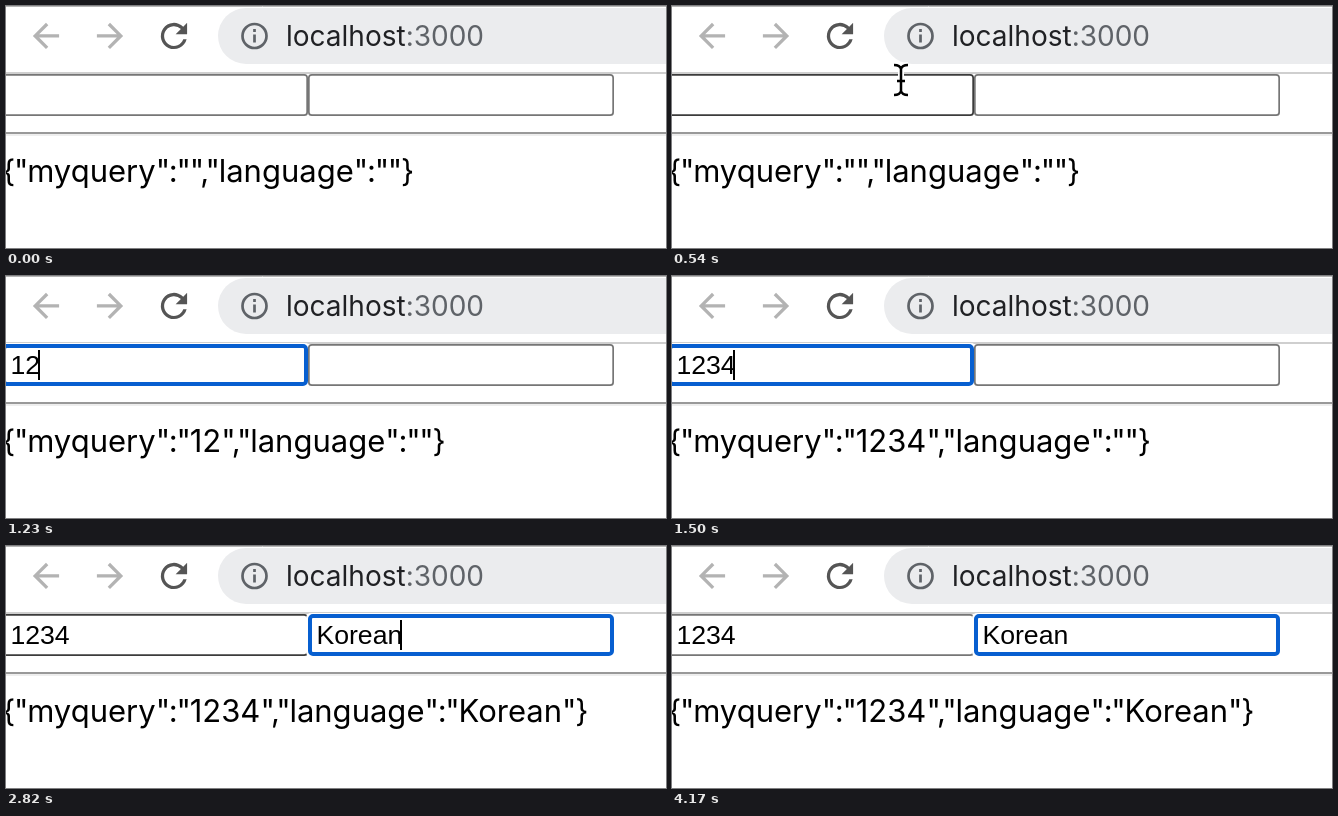
Animation of 660 by 242 pixels, one loop 4260 ms. Source, as an HTML page:

```html
<!DOCTYPE html>
<html lang="en">
<meta charset="utf-8">
<title>Form state</title>
<style>
  html, body { margin: 0; width: 100%; height: 100%; overflow: hidden; background: #fff; }
  svg { display: block; width: 660px; height: 242px; }
  text { white-space: pre; }
  .ui { font-family: Inter, Roboto, sans-serif; }
  .sign { letter-spacing: -1.25px; }
  .field text { font: 26.67px "Liberation Sans", Arial, sans-serif; }
  .field rect { fill: #fff; }
</style>
<svg viewBox="0 0 660 242">
  <defs>
    <path id="back" d="M20 11H7.830l5.590-5.590L12 4l-8 8 8 8 1.410-1.410L7.830 13H20z"/>
    <path id="bar" d="M-7-15Q-1-15 0-11Q1-15 7-15M0-11V11M-7 15Q-1 15 0 11Q1 15 7 15M-4 1H4"/>
  </defs>
  <path d="M0 .5H660" stroke="#b4b4b4"/>
  <rect x="212" y="2" width="500" height="56" rx="28" fill="#ebecee"/>
  <path d="M0 67H660" stroke="#cfcfcf" stroke-width="2"/>
  <use href="#back" transform="translate(20.300 10.300) scale(1.640)" fill="#b3b3b3"/>
  <use href="#back" transform="translate(123.700 10.300) scale(-1.640 1.640)" fill="#b3b3b3"/>
  <path transform="translate(148.300 10.300) scale(1.640)" fill="#555"
    d="M17.650 6.350A8 8 0 1 0 19.730 14H17.650A6 6 0 1 1 16.220 7.780L13 11H20V4Z"/>
  <g fill="none" stroke="#5f6368" stroke-width="2.700">
    <circle cx="248.500" cy="30" r="12"/>
    <path d="M248.500 28.500V36.500M248.500 23V26"/>
  </g>
  <text class="ui" x="280" y="40" font-size="28" fill="#202124">localhost<tspan fill="#5f6368">:3000</tspan></text>
  <path d="M0 127H660" stroke="#999" stroke-width="2"/>
  <path d="M0 129H660" stroke="#eee" stroke-width="2"/>
  <text class="ui" id="json" x="-4" y="176" font-size="31"></text>
  <g id="fields"></g>
  <g id="mouse" stroke-linejoin="round">
    <g id="beam" fill="none">
      <use href="#bar" stroke="#fff" stroke-width="6"/>
      <use href="#bar" stroke="#000" stroke-width="2.500"/>
    </g>
    <path id="pointer" d="M0 0V24L5.500 19L9.500 28L13.500 26L9.500 17.500H17Z" stroke="#fff" stroke-width="2"/>
  </g>
</svg>
<script>
const LOOP = 4260, BLINK = 450;
const $ = id => document.getElementById(id);
const show = (el, on) => el.setAttribute('visibility', on ? 'visible' : 'hidden');
const set = (el, attrs) => { for (const k in attrs) el.setAttribute(k, attrs[k]); };

function add(parent, tag, attrs) {
  const el = document.createElementNS('http://www.w3.org/2000/svg', tag);
  set(el, attrs);
  return parent.appendChild(el);
}

function makeField(x, word, focus, blur, keys) {
  const g = add($('fields'), 'g', { class: 'field' });
  return {
    x, word, focus, blur, keys,
    halo: add(g, 'rect', { x: x - 2, y: 67, width: 310, height: 44, rx: 5 }),
    box: add(g, 'rect', {}),
    text: add(g, 'text', { x: x + 8.4, y: 98 }),
    caret: add(g, 'rect', { y: 74, width: 2, height: 30, style: 'fill:#000' })
  };
}

const fields = [
  makeField(-4, '1234', 810, 1650, [1080, 1200, 1350, 1500]),
  makeField(302, 'Korean', 1650, LOOP, [2160, 2280, 2400, 2520, 2640, 2820])
];

function mouseAt(t) {
  if (t < 540) {
    const k = ((540 - t) / 270) ** 2;
    return [229 + 390 * k, 74 + 64 * k];
  }
  const u = Math.min(1, (t - 540) / 240), e = u * u * (3 - 2 * u);
  return [229 - 13 * e, 74 + 14 * e];
}

function drawField(f, t, hover) {
  const typed = f.keys.filter(k => t >= k);
  const focused = t >= f.focus && t < f.blur;
  const line = focused ? 4 : 1.7;
  f.value = f.word.slice(0, typed.length);
  f.text.textContent = f.value;
  show(f.halo, focused);
  set(f.box, {
    x: f.x + line / 2, y: 68 + line / 2, width: 306 - line, height: 42 - line, rx: 3,
    stroke: focused ? '#075fd0' : hover ? '#3c3c3c' : '#767676',
    'stroke-width': line
  });
  const since = t - Math.max(f.focus, ...typed);
  show(f.caret, focused && since % (2 * BLINK) < BLINK);
  set(f.caret, { x: Math.round(f.x + 8 + (f.value ? f.text.getComputedTextLength() - 2 : 0)) });
}

// Punctuation is set tighter than words.
function drawJson(data) {
  $('json').textContent = '';
  for (const part of JSON.stringify(data).match(/\w+|\W+/g))
    add($('json'), 'tspan', /\w/.test(part) ? {} : { class: 'sign' }).textContent = part;
}

function draw(t) {
  const [x, y] = mouseAt(t);
  const inside = y > 68 && y < 110;
  const arrived = t >= 270 && t < 4020;
  fields.forEach(f => drawField(f, t, arrived && inside && x > f.x && x < f.x + 306));
  drawJson({ myquery: fields[0].value, language: fields[1].value });
  const visible = t >= 270 && t < 1080;
  show($('beam'), visible && inside);
  show($('pointer'), visible && !inside);
  set($('mouse'), { transform: `translate(${x} ${y})` });
}

function tick() {
  const t = performance.now() % LOOP;
  draw(Math.floor(t / 30) * 30);
  requestAnimationFrame(tick);
}
tick();
</script>
</html>
```
